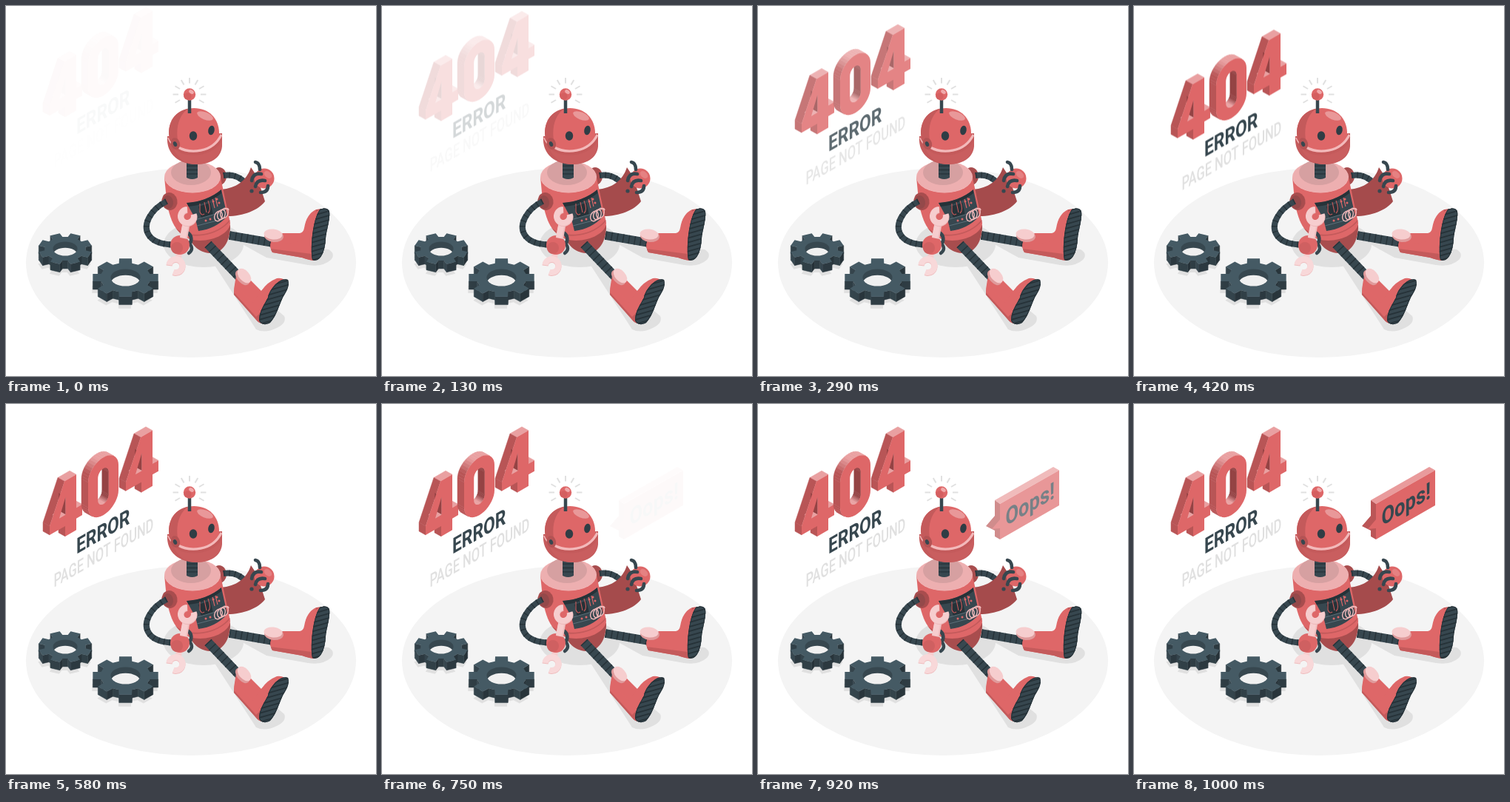
These frames come from a looping animation (500 px wide and 500 px high, 1.04 s). An HTML page with a canvas:

```html
<!DOCTYPE html>
<html lang="en">
<head>
<meta charset="utf-8">
<title>404 Error</title>
<style>
html, body { margin: 0; width: 100%; height: 100%; overflow: hidden; background: #fff; }
canvas { display: block; width: 500px; height: 500px; }
</style>
</head>
<body>
<canvas id="stage" width="500" height="500"></canvas>
<script>
const LOOP = 1040, FPS = 24, ISO = 0.577;
const RED = '#de6768', DEEP = '#c45a5b', DARK = '#a84d4e', PINK = '#f3b9ba', PALE = '#f6cdce';
const SLATE = '#37474f', NIGHT = '#263238', STEEL = '#455a64', SHADE = '#e0e0e0';
const stage = document.getElementById('stage').getContext('2d');
let g;

function layer(draw) {
  const c = document.createElement('canvas');
  c.width = c.height = 500;
  g = c.getContext('2d');
  draw();
  return c;
}

function fill(d, color) {
  g.fillStyle = color;
  g.fill(new Path2D(d));
}

function line(d, color, width, dash = [], cap = 'butt') {
  g.strokeStyle = color;
  g.lineWidth = width;
  g.lineCap = cap;
  g.setLineDash(dash);
  g.stroke(new Path2D(d));
  g.setLineDash([]);
}

function oval(x, y, rx, ry, color, rot = 0) {
  g.fillStyle = color;
  g.beginPath();
  g.ellipse(x, y, rx, ry, rot, 0, Math.PI * 2);
  g.fill();
}

function clipped(d, draw) {
  g.save();
  g.clip(new Path2D(d));
  draw();
  g.restore();
}

function tube(d, width, gap = 6) {
  line(d, SLATE, width);
  line(d, NIGHT, width, [1.4, gap]);
}

const mix = (a, b, k) => 'rgb(' + a.map((v, i) => Math.round(v + (b[i] - v) * k)) + ')';
const clamp = v => Math.max(0, Math.min(1, v));
const toPath = pts => 'M' + pts.map(p => p.join(' ')).join('L') + 'Z';

// Rings run clockwise, holes run counter-clockwise.
function prism(rings, dx, dy, face, shade) {
  const walls = [];
  rings.forEach((ring, hole) => ring.forEach((a, i) => {
    const b = ring[(i + 1) % ring.length];
    const ex = b[0] - a[0], ey = b[1] - a[1], len = Math.hypot(ex, ey) || 1;
    const nx = ey / len, ny = -ex / len;
    if (nx * dx + ny * dy <= 0) return;
    const quad = [a, b, [b[0] + dx, b[1] + dy], [a[0] + dx, a[1] + dy]];
    walls.push({ y: a[1] + b[1], d: toPath(quad), color: shade(nx, ny, hole) });
  }));
  walls.sort((p, q) => p.y - q.y).forEach(w => {
    fill(w.d, w.color);
    line(w.d, w.color, 0.5);
  });
  g.fillStyle = face;
  g.fill(new Path2D(rings.map(toPath).join('')), 'evenodd');
}

function isoText(str, x, y, font, wide, color) {
  g.save();
  g.setTransform(wide, -ISO * wide, 0, 1, x, y);
  g.font = font;
  g.fillStyle = color;
  g.fillText(str, 0, 0);
  g.restore();
}

/* ---------- sign ---------- */

const signPoint = (u, v) => [59 + u, 177 + v - ISO * u];

function signShade(nx, ny, hole) {
  const side = hole ? [148, 67, 68] : [184, 85, 86];
  return mix(side, [233, 160, 161], clamp((-ny - 0.35) / 0.4));
}

function four(u) {
  const at = ([a, b]) => signPoint(a + u, b);
  const outer = [[0, 0], [0, -12], [20, -61], [36, -61], [36, -16], [44, -16],
    [44, -1.5], [36, -1.5], [36, 14], [21, 14], [21, 0]].map(at);
  const hole = [[13, -15], [21.5, -15], [21.5, -39]].map(at);
  prism([outer, hole], -9, -5, RED, signShade);
}

function stadium(cx, top, bottom, r, ry) {
  const pts = [];
  for (let i = 0; i <= 40; i++) {
    const a = Math.PI + i / 20 * Math.PI;
    const mid = i <= 20 ? top + ry : bottom - ry;
    pts.push(signPoint(cx + r * Math.cos(a), mid + ry * Math.sin(a)));
    if (i === 20) pts.push(signPoint(cx + r, bottom - ry));
  }
  return pts;
}

function drawSign() {
  four(0);
  prism([stadium(72.5, -63, 15, 20.5, 22), stadium(72.5, -48, 0, 7.3, 9).reverse()],
    -9, -5, RED, signShade);
  four(103);
  isoText('ERROR', 95, 203, '700 29.5px Roboto, sans-serif', 0.775, SLATE);
  isoText('PAGE NOT FOUND', 64.5, 248, '500 25px Roboto, sans-serif', 0.66, SHADE);
}

/* ---------- speech bubble ---------- */

function drawBubble() {
  fill('M320 130L399 85L407 89.500L327 135Z', '#e99b9c');
  fill('M320 130L327 135V183L320 179V171L308 165L320 151Z', '#bb5657');
  fill('M327 135L407 89.500V137L327 183V168L316 169L327 156Z', RED);
  isoText('Oops!', 334.5, 165, '700 31.5px Roboto, sans-serif', 0.81, SLATE);
}

/* ---------- gears ---------- */

function gear(x, y, r, turn, depth, hole) {
  const pts = [];
  for (let i = 0; i < 8; i++) {
    const mid = turn + i * Math.PI / 4;
    [[-0.26, 0.76], [-0.19, 1], [0.19, 1], [0.26, 0.76]].forEach(([da, k]) =>
      pts.push([x + r * k * Math.cos(mid + da), y + r * k * 0.58 * Math.sin(mid + da)]));
  }
  fill(toPath(pts.map(p => [p[0] - 1, p[1] + depth + 5])), SHADE);
  prism([pts], 0, depth, STEEL, nx => mix([38, 50, 56], [55, 71, 79], clamp(0.5 - nx * 0.7)));
  oval(x, y, hole, hole * 0.58, SLATE);
  g.save();
  g.beginPath();
  g.ellipse(x, y, hole, hole * 0.58, 0, 0, 7);
  g.clip();
  oval(x, y + depth * 0.75, hole, hole * 0.58, '#f0f0f0');
  g.restore();
}

/* ---------- robot ---------- */

function drawFloor() {
  oval(250, 347, 223, 128, '#f4f4f4');
  oval(267, 322, 54, 31, SHADE);
  fill('M274 338L284 331L320 372L376 419Q380 428 366 435Q350 443 338 437Z', SHADE);
  fill('M305 314L360 322L436 329Q446 335 439 343Q428 353 408 350L352 340Z', SHADE);
  gear(80, 328, 36.5, Math.PI / 8, 11, 16.5);
  gear(161.5, 367, 45, 0, 11, 20);
}

function sole(d) {
  fill(d, SLATE);
  clipped(d, () => {
    for (let y = 270; y < 460; y += 6) line(`M335 ${y + 12}L440 ${y - 18}`, NIGHT, 1.8);
    line(d, NIGHT, 2);
  });
}

function drawLegs() {
  tube('M302 310L360 320', 11.500, 6.500);
  tube('M273 322L316 367', 12.500, 6.500);

  const boot = 'M358 318L374 307H397Q402 306 403 300Q406 281 419 275L430 274L418 344Q411 344 400 340L360 333Q356 327 358 318Z';
  fill(boot, RED);
  clipped(boot, () => {
    fill('M356 322Q380 326 404 319Q416 306 419 275L440 270L420 350L350 340Z', DEEP);
    fill('M357 321Q382 324 400 316Q411 305 416 280L424 275L413 335L357 328Z', RED);
  });
  sole('M424 275C432 272 439 273 437 285C436 296 433 304 432 314C431 334 424 347 414 343C411 329 414 289 424 275Z');
  oval(362, 311, 13, 8, '#e09a9b', 0.1);
  oval(361, 308.500, 12.500, 7, PALE, 0.1);

  const left = 'M312 361Q308 377 308 390L338 424Q342 430 350 429L360 403L378 372Q374 367 366 368Q353 373 345 385L331 371Z';
  fill(left, RED);
  clipped(left, () => {
    fill('M306 382L336 412Q340 394 364 374L382 366L352 434H338L304 394Z', DEEP);
    fill('M309 376L334 401Q344 381 362 373L374 368L343 415L338 420L307 386Z', RED);
  });
  sole('M381 370C384 379 378 387 374 394C369 404 366 418 357 428C350 432 344 430 342 425C342 412 350 402 354 394C356 382 371 366 381 370Z');
  oval(319.500, 367, 12, 7, '#e09a9b', 0.85);
  oval(322, 364.500, 11.500, 7, PALE, 0.85);
}

function drawRightArm() {
  oval(288, 230, 10, 12, DARK);
  tube('M294 229C306 227 318 231 326 242', 8);
  fill('M290 248C312 246 325 236 331 218L339 230L350 264C341 276 321 284 299 284Z', '#a54b4c');
  oval(332, 250, 2.600, 2.600, SLATE);
  oval(349, 233, 13.500, 13.500, RED);
  oval(354, 228, 6, 4, '#e58182', 0.7);
  ['M337 211Q343 212 343 221', 'M332 236Q334 225 345 227',
    'M337 244Q339 234 350 236', 'M344 252Q354 252 354 243']
    .forEach(d => line(d, SLATE, 4.600, [], 'round'));
}

function drawBody() {
  fill('M248 313C262 320 296 312 303 295C304 315 295 332 280 334C265 335 252 326 248 313Z', DARK);
  const torso = 'M214 231L217 262C221 290 230 308 248 315C272 322 303 309 303 293L290 232Z';
  fill(torso, RED);
  clipped(torso, () => {
    fill('M212 231L216 262C222 296 232 312 252 320L210 325Z', DEEP);
    line('M228 300C246 317 286 311 303 289', DEEP, 2);
  });
  oval(252, 231, 38, 21.500, PINK);
  oval(252, 231, 37.500, 21, '#edafb0');
  oval(250, 225, 27, 17, '#d6a0a1');

  const panel = 'M244 266Q272 264 291 248L299 284Q284 301 260 304L256 288Z';
  fill(panel, SLATE);
  clipped(panel, () => {
    fill('M244 266Q272 264 291 248V253Q271 269 246 271Z', NIGHT);
    fill('M260 271L276 266L280 282L264 287Z', NIGHT);
    line('M262 267V278Q264 284 268 281M268 265L271 279M273 263Q278 276 273 280', '#c9595a', 1.100);
    line('M279 261L282 273M283 259L286 271', RED, 1.100);
    line('M252 290L290 279M258 297L285 290', '#5c707a', 1);
    [[280, 264], [285, 261], [288, 266], [276, 288], [270, 290]]
      .forEach(([x, y]) => oval(x, y, 1.500, 1.500, RED));
  });
  for (let i = 0; i < 3; i++) {
    g.strokeStyle = PINK;
    g.lineWidth = 1.400;
    g.beginPath();
    g.ellipse(287 + i * 4, 284 - i * 2, 5, 7, 0.4, 0, 7);
    g.stroke();
  }
  line('M294 276Q300 271 301 276', PINK, 1.400);
}

function jaw(x, y, r, open, color) {
  g.strokeStyle = color;
  g.lineWidth = 8;
  g.lineCap = 'butt';
  g.beginPath();
  g.arc(x, y, r, open + 0.65, open - 0.65 + Math.PI * 2);
  g.stroke();
}

function drawLeftArm() {
  oval(221, 264, 10.500, 12, DARK, -0.2);
  oval(219, 265, 7, 9, '#94494a', -0.2);
  tube('M217 264C195 275 183 297 194 311C202 321 215 322 229 323', 8);
  line('M245 306Q253 311 249 321M247 320Q255 328 247 334', SLATE, 4.500, [], 'round');
  line('M235 322L233 341', PALE, 8);
  oval(235, 323, 13, 13, RED);
  oval(231, 327, 8, 8, '#cf6061');
  line('M244 292L240 314', '#f0c0c1', 10);
  line('M243 292L239 313', PALE, 8);
  jaw(245.500, 285, 9, -0.95, '#edb7b8');
  jaw(245, 284, 9, -0.95, PALE);
  jaw(229.500, 352, 9, 2.600, '#efbdbe');
  jaw(229.500, 351, 9, 2.600, '#f8d8d9');
}

function drawHead() {
  tube('M251.500 210V232', 15, 4);
  oval(251.500, 231, 7.500, 3, SLATE);
  fill('M218 176C216 202 236 214 257 214C280 214 292 202 292 188V172Z', DEEP);
  fill('M226 191C239 207 278 206 292 182C292 203 279 213 257 214C243 214 231 206 226 191Z', '#c95e5f');

  const dome = 'M220 172C220 150 235 138 254 138C274 138 288 152 288 172V180C280 201 234 201 221 180Z';
  fill(dome, RED);
  clipped(dome, () => fill('M220 200V136H251C232 145 227 168 235 196Z', DEEP));
  line('M232 190.500C248 200 279 199 291 174', PINK, 3.200);
  line('M219 178Q221 184 226 188', PINK, 1.500);
  oval(269, 148.500, 11.500, 5, '#e99899', 0.38);
  oval(253, 175.500, 5.200, 6.200, '#2f3d45');
  oval(277.500, 168, 4.200, 6.400, '#2f3d45', 0.2);
  oval(229, 186, 6, 8, '#b45354', -0.3);
  oval(228.500, 186.500, 2.500, 3.600, SLATE, -0.4);

  line('M248 126V145', SLATE, 4.500);
  oval(248, 119.500, 8.200, 8.200, RED);
  oval(245.500, 122, 5, 4.500, '#d45f60');
  oval(250.500, 116, 3.600, 2.500, '#f0a9aa', 0.6);
  for (let i = -7; i <= 1; i++) {
    const c = Math.cos(i * Math.PI / 6), s = Math.sin(i * Math.PI / 6);
    line(`M${248 + 15 * c} ${119.5 + 15 * s}L${248 + 22.5 * c} ${119.5 + 22.5 * s}`, SHADE, 2);
  }
}

/* ---------- timing ---------- */

function ease(p) {
  if (p >= 1) return 1;
  const bez = (a, b, s) => 3 * (1 - s) * (1 - s) * s * a + 3 * (1 - s) * s * s * b + s * s * s;
  let lo = 0, hi = 1;
  for (let i = 0; i < 24; i++) {
    const s = (lo + hi) / 2;
    if (bez(0.36, 0.5, s) < p) lo = s; else hi = s;
  }
  return bez(-0.01, 1.38, lo);
}

const scene = layer(() => {
  drawFloor();
  drawRightArm();
  drawBody();
  drawLegs();
  drawLeftArm();
  drawHead();
});
const sign = layer(drawSign);
const bubble = layer(drawBubble);

function render(now) {
  const tick = Math.floor((now % LOOP + 3.4) * FPS / 1000);
  const drop = ease((Math.max(tick - 1, 0) + 1.3) / 13.7);
  stage.globalAlpha = 1;
  stage.fillStyle = '#fff';
  stage.fillRect(0, 0, 500, 500);
  stage.drawImage(scene, 0, 0);
  stage.globalAlpha = clamp(drop);
  stage.drawImage(sign, 0, 30 * (drop - 1));
  stage.globalAlpha = clamp((tick - 17.8) / 6.2);
  stage.drawImage(bubble, 0, 0);
  requestAnimationFrame(render);
}
render(performance.now());
</script>
</body>
</html>
```
